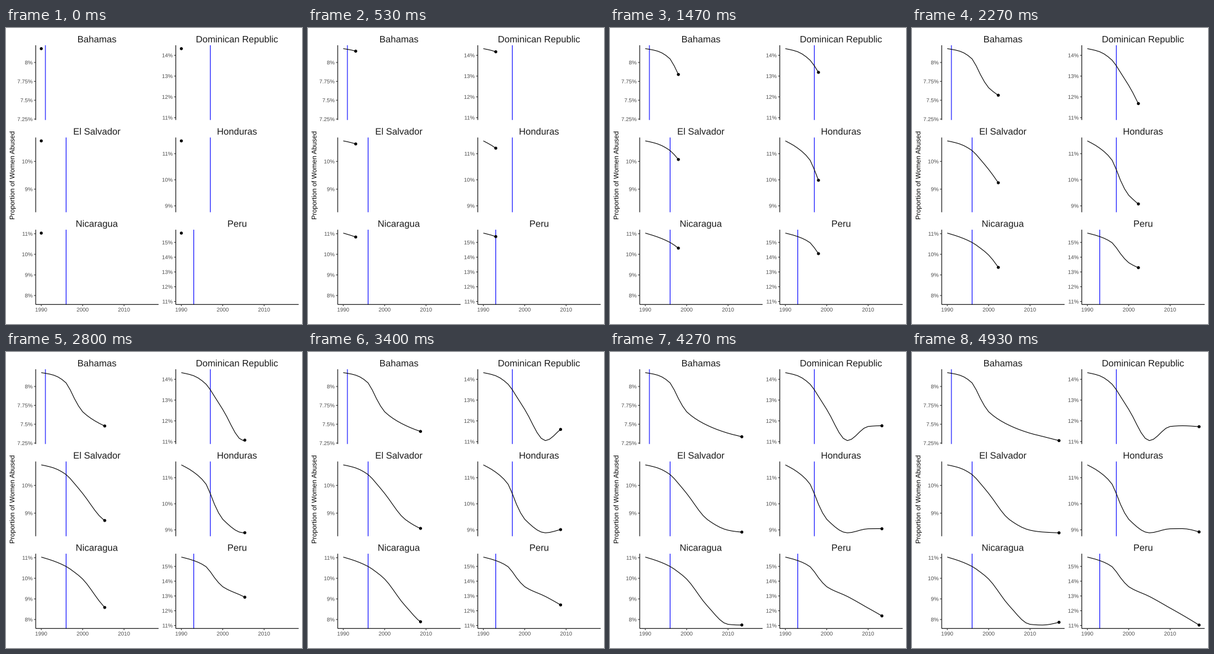
Recreate the animation shown at these times as a matplotlib script. Size 480 px wide and 480 px high, loop 6.67 s.

```python
import matplotlib.pyplot as plt
import numpy as np
from matplotlib.animation import FuncAnimation
from matplotlib.patches import Circle, PathPatch
from matplotlib.textpath import TextPath
from matplotlib.transforms import Affine2D

plt.rcParams["lines.solid_capstyle"] = "butt"

SIZE, DPI = 480, 72
LOOP_MS, FRAMES, LAST_STEP = 6670, 200, 74
YEARS = np.arange(28)                 # years since 1990
YEAR_W = 6.71                         # pixels per year
PANEL_W, PANEL_H, ROW_STEP = 29.7 * YEAR_W, 121.2, 149.55
LEFTS, TOP = (48.15, 275.3), 28.0
LINE_W = 1.07

# Key percentages at these years; the curves run smoothly through them.
KEY_YEARS = np.array([0, 3, 6, 8, 10, 15, 20, 23, 27])
PANELS = [  # name, law year, tick step, key percentages
    ("Bahamas", 1, 0.25,
     [8.183, 8.15, 8.047, 7.841, 7.665, 7.485, 7.381, 7.339, 7.283]),
    ("Dominican Republic", 7, 1,
     [14.32, 14.17, 13.76, 13.18, 12.55, 11.05, 11.73, 11.765, 11.72]),
    ("El Salvador", 6, 1,
     [10.74, 10.63, 10.39, 10.07, 9.71, 8.77, 8.385, 8.32, 8.29]),
    ("Honduras", 7, 1,
     [11.49, 11.21, 10.745, 9.98, 9.405, 8.885, 9.04, 9.045, 8.92]),
    ("Nicaragua", 6, 1,
     [11.03, 10.84, 10.575, 10.3, 9.965, 8.66, 7.765, 7.73, 7.865]),
    ("Peru", 3, 1,
     [15.63, 15.395, 14.975, 14.24, 13.625, 12.965, 12.18, 11.705, 11.03]),
]

# Each year is reached on a whole step; the head runs evenly in between.
YEAR_STEPS = np.round(YEARS / YEARS[-1] * LAST_STEP)


def smooth(values):
    """Monotone cubic through the key points, sampled once a year."""
    values, widths = np.array(values), np.diff(KEY_YEARS)
    rise = np.diff(values) / widths
    before, after = rise[:-1], rise[1:]
    slopes = np.zeros(len(values))
    same_way = before * after > 0
    slopes[1:-1][same_way] = (2 * before * after / (before + after))[same_way]
    slopes[0] = (3 * rise[0] - slopes[1]) / 2
    slopes[-1] = (3 * rise[-1] - slopes[-2]) / 2

    i = np.clip(np.searchsorted(KEY_YEARS, YEARS, "right") - 1, 0, len(widths) - 1)
    w = widths[i]
    t = (YEARS - KEY_YEARS[i]) / w
    return ((1 + 2 * t) * (1 - t) ** 2 * values[i]
            + t * (1 - t) ** 2 * w * slopes[i]
            + t ** 2 * (3 - 2 * t) * values[i + 1]
            - t ** 2 * (1 - t) * w * slopes[i + 1])


fig = plt.figure(figsize=(SIZE / DPI, SIZE / DPI), dpi=DPI, facecolor="white")
ax = fig.add_axes([0, 0, 1, 1])
ax.set(xlim=(0, SIZE), ylim=(SIZE, 0))
ax.axis("off")


def segment(x0, y0, x1, y1, color="black", z=4):
    ax.plot([x0, x1], [y0, y1], color=color, lw=LINE_W, zorder=z, snap=False)


def label(x, y, text, size, color, anchor=0.5, angle=0):
    """Outline text on baseline y; anchor 0.5 centres it on x, 1 ends it there."""
    path = TextPath((0, 0), text, size=size, prop={"family": "Liberation Sans"})
    box = path.get_extents()
    place = (Affine2D().translate(-box.x0 - anchor * box.width, 0)
             .scale(1, -1).rotate_deg(-angle).translate(x, y))
    ax.add_patch(PathPatch(place.transform_path(path), fc=color, lw=0, snap=False))


def draw_panel(index, name, law_year, tick_step, keys):
    row, col = divmod(index, 2)
    left, top = LEFTS[col], TOP + row * ROW_STEP
    bottom, start = top + PANEL_H, left + 1.35 * YEAR_W
    margin = 0.05 * (max(keys) - min(keys))
    low, high = min(keys) - margin, max(keys) + margin

    def height(percent):
        return bottom - (percent - low) / (high - low) * PANEL_H

    label(left + PANEL_W / 2, top - 4.7, name, 15, "#1a1a1a")
    law_x = start + law_year * YEAR_W
    segment(law_x, top, law_x, bottom, "blue", z=1)
    segment(left, top, left, bottom)

    for percent in np.arange(np.ceil(low / tick_step) * tick_step, high, tick_step):
        y = height(percent)
        segment(left - 2.75, y, left, y, "#333333")
        label(left - 5.2, y + 3.15, f"{percent:g}%", 8.8, "#4d4d4d", anchor=1)

    if row == 2:
        segment(left, bottom, left + PANEL_W, bottom)
        for year in (0, 10, 20):
            x = start + year * YEAR_W
            segment(x, bottom, x, bottom + 2.75, "#333333")
            label(x, bottom + 11.4, str(1990 + year), 8.8, "#4d4d4d")

    curve, = ax.plot([], [], color="black", lw=LINE_W, zorder=2)
    head = ax.add_patch(Circle((start, top), 2.45, fc="black", lw=0, zorder=3))
    return start, height(smooth(keys)), curve, head


label(13.6, 239, "Proportion of Women Abused", 11, "black", angle=90)
panels = [draw_panel(i, *panel) for i, panel in enumerate(PANELS)]


def update(frame):
    step = min((frame + 1) // 2, LAST_STEP)     # the picture moves every other frame
    now = np.interp(step, YEAR_STEPS, YEARS)
    years = np.append(YEARS[YEARS < now], now)
    artists = []
    for start, heights, curve, head in panels:
        x, y = start + years * YEAR_W, np.interp(years, YEARS, heights)
        curve.set_data(x, y)
        head.set_center((x[-1], y[-1]))
        artists += [curve, head]
    return artists


anim = FuncAnimation(fig, update, frames=FRAMES, interval=LOOP_MS / FRAMES,
                     repeat=True, repeat_delay=0)
plt.show()
```
